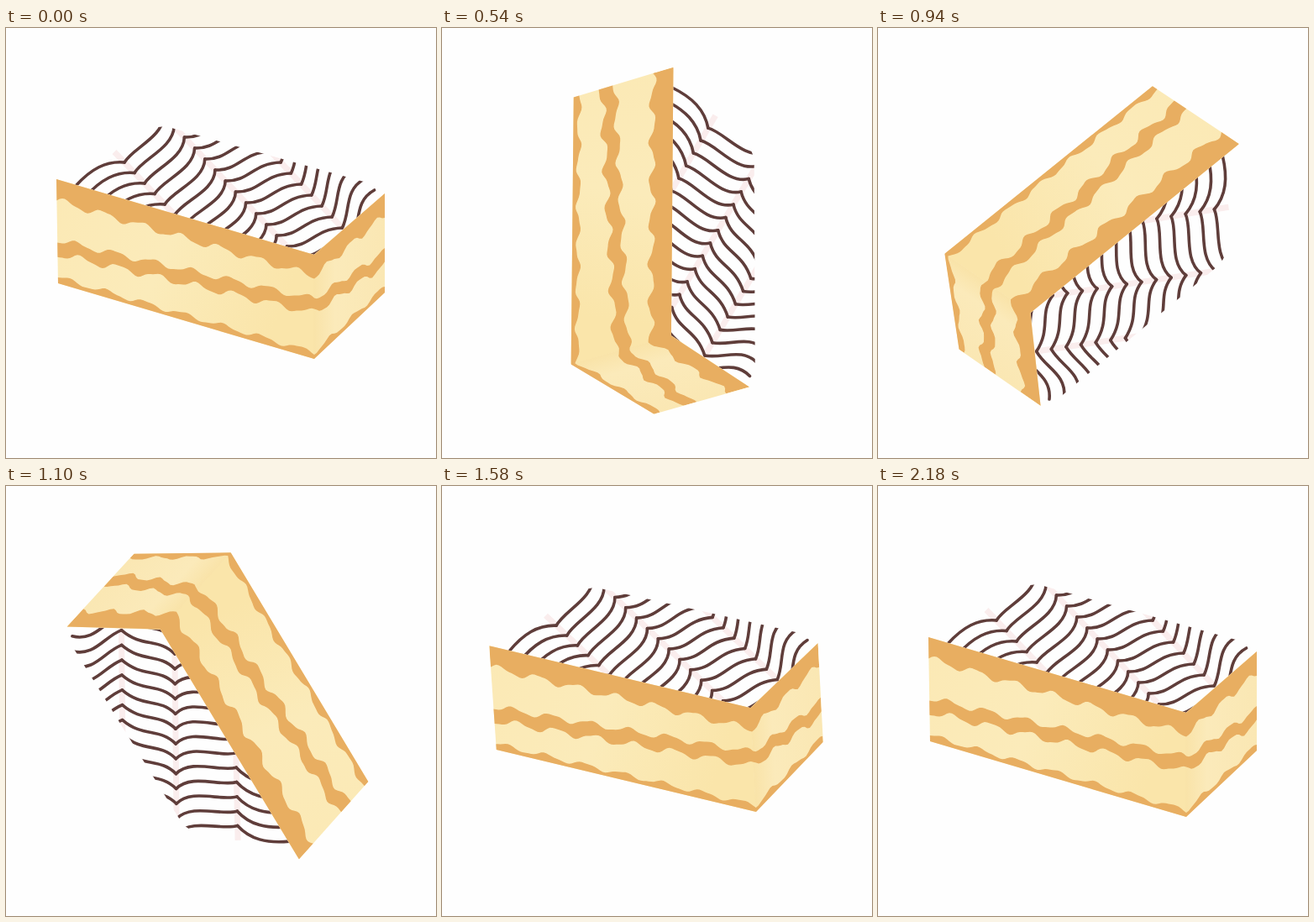
Animation, 512 px wide and 512 px high, one loop 3600 ms. Source, as an HTML page:

```html
<!DOCTYPE html>
<html lang="en">
<head>
<meta charset="utf-8">
<title>Spinning custard slice</title>
<style>
  html, body { margin: 0; width: 100%; height: 100%; overflow: hidden; background: #fefefe; }
  svg { display: block; width: 100vw; height: 100vh; }
  .crust { fill: #e8ae61; }
  .ridge { fill: none; stroke: #faeded; stroke-width: 7; }
  .drizzle { fill: none; stroke: #5f3d3a; stroke-width: 3.6; stroke-linecap: round; }
</style>
</head>
<body>
<svg viewBox="0 0 512 512">
  <defs>
    <linearGradient id="front" x1="0" y1="0" x2="1" y2=".3">
      <stop offset="0" stop-color="#fbe9b5"/>
      <stop offset=".5" stop-color="#fbebba"/>
      <stop offset="1" stop-color="#fae5aa"/>
    </linearGradient>
    <linearGradient id="end">
      <stop offset="0" stop-color="#f9e3a8"/>
      <stop offset=".3" stop-color="#fbeaba"/>
      <stop offset="1" stop-color="#fae7b3"/>
    </linearGradient>
    <clipPath id="sides"><path d="M60 180L367 270L451 197V315L367 394L62 304Z"/></clipPath>
    <clipPath id="top"><path d="M60 180L120 125L190 117L444 188L451 197L367 270Z"/></clipPath>
  </defs>
  <g id="cake">
    <g id="icing" clip-path="url(#top)"></g>
    <path d="M60 180L367 270V394L62 304Z" fill="url(#front)"/>
    <path d="M366.5 270L451 197V315L366.5 394Z" fill="url(#end)"/>
    <g id="layers" clip-path="url(#sides)"></g>
  </g>
</svg>
<script>
const cake = document.getElementById('cake');

function addPath(parent, className, d) {
  const path = document.createElementNS('http://www.w3.org/2000/svg', 'path');
  path.setAttribute('class', className);
  path.setAttribute('d', d);
  document.getElementById(parent).append(path);
}

// Feathered icing: S-shaped lines between evenly spaced points on three ridges.
const ridge = (x, y, dx, dy) => i => [x + dx * i, y + dy * i];
const left = ridge(141, 160, 12, 12.5);
const middle = ridge(188, 104, 12.2, 13);
const right = ridge(254, 82, 12.2, 13);
const shift = ([x, y], dx, dy) => [x + dx, y + dy];

function drizzle(from, outX, outY, to, inX, inY) {
  addPath('icing', 'drizzle', `M${from}C${shift(from, outX, outY)} ${shift(to, inX, inY)} ${to}`);
}

for (const [line, first, last] of [[left, -1, 6], [middle, 1, 13], [right, 5, 13]]) {
  addPath('icing', 'ridge', `M${line(first)}L${line(last)}`);
}
for (let i = 0; i < 16; i++) {
  const a = left(i), b = middle(i), c = right(i);
  drizzle(shift(a, -58, 28), 18, -20, a, -22, -2);
  drizzle(a, 10, -17, b, -1, 26);
  drizzle(b, 28, 1, c, -33, 1);
  drizzle(c, 10, -20, shift(c, 26, -58), -24, 13);
}

// Pastry layers: wavy bands that follow the top edge around the corner.
const LEFT = 60, CORNER = 367, RIGHT = 451;
const roof = x => x < CORNER ? 180 + (x - LEFT) * .293 : 270 - (x - CORNER) * .869;
const depth = x => x < CORNER ? 124 : 124 - (x - CORNER) * .07;
const sag = x => .49 + .16 * (x < CORNER ? (CORNER - x) / (CORNER - LEFT) : (x - CORNER) / (RIGHT - CORNER));

function wave(x, peak, height) {
  const along = x < CORNER ? x : CORNER + (x - CORNER) * 1.6;
  const phase = (along - peak) / 46 * 2 * Math.PI;
  return height * (Math.cos(phase) + .25 * Math.sin(2.3 * phase));
}

function edge(offset) {
  const points = [];
  for (let x = LEFT - 2; x <= RIGHT + 2; x += 3) points.push([x, (roof(x) + offset(x)).toFixed(1)]);
  return points;
}

function band(upper, lower) {
  addPath('layers', 'crust', `M${edge(upper).join('L')}L${edge(lower).reverse().join('L')}Z`);
}

band(() => -9, x => 25.5 + wave(x, 93, 4));
band(x => sag(x) * depth(x) - 8 + wave(x, 106, 3.5), x => sag(x) * depth(x) + 8.5 + wave(x, 111, 4));
band(x => depth(x) - 7.5 + wave(x, 143, 2.8), x => depth(x) + 9);

const LOOP = 3600, STEP = 20, START = 20, JOIN = 540, STOP = 2180, SETTLE = 2220;
const TURNS = 4 * 360;

// Degrees left to turn on the cubic run-out, which overshoots slightly.
const CUBIC = 2.13e-7, SQUARE = 1.29e-4;
const remaining = t => (SETTLE - t) ** 2 * (CUBIC * (SETTLE - t) - SQUARE);
const speed = t => (SETTLE - t) * (3 * CUBIC * (SETTLE - t) - 2 * SQUARE);

function angleAt(t) {
  if (t <= START || t >= STOP) return 0;
  if (t >= JOIN) return TURNS - remaining(t);
  const span = JOIN - START, p = (t - START) / span;
  const reached = TURNS - remaining(JOIN);
  return reached * p * p * (3 - 2 * p) + speed(JOIN) * span * p * p * (p - 1);
}

function draw() {
  const t = Math.floor(performance.now() % LOOP / STEP) * STEP;
  cake.setAttribute('transform', `rotate(${angleAt(t).toFixed(2)} 256 256)`);
  requestAnimationFrame(draw);
}
draw();
</script>
</body>
</html>
```
